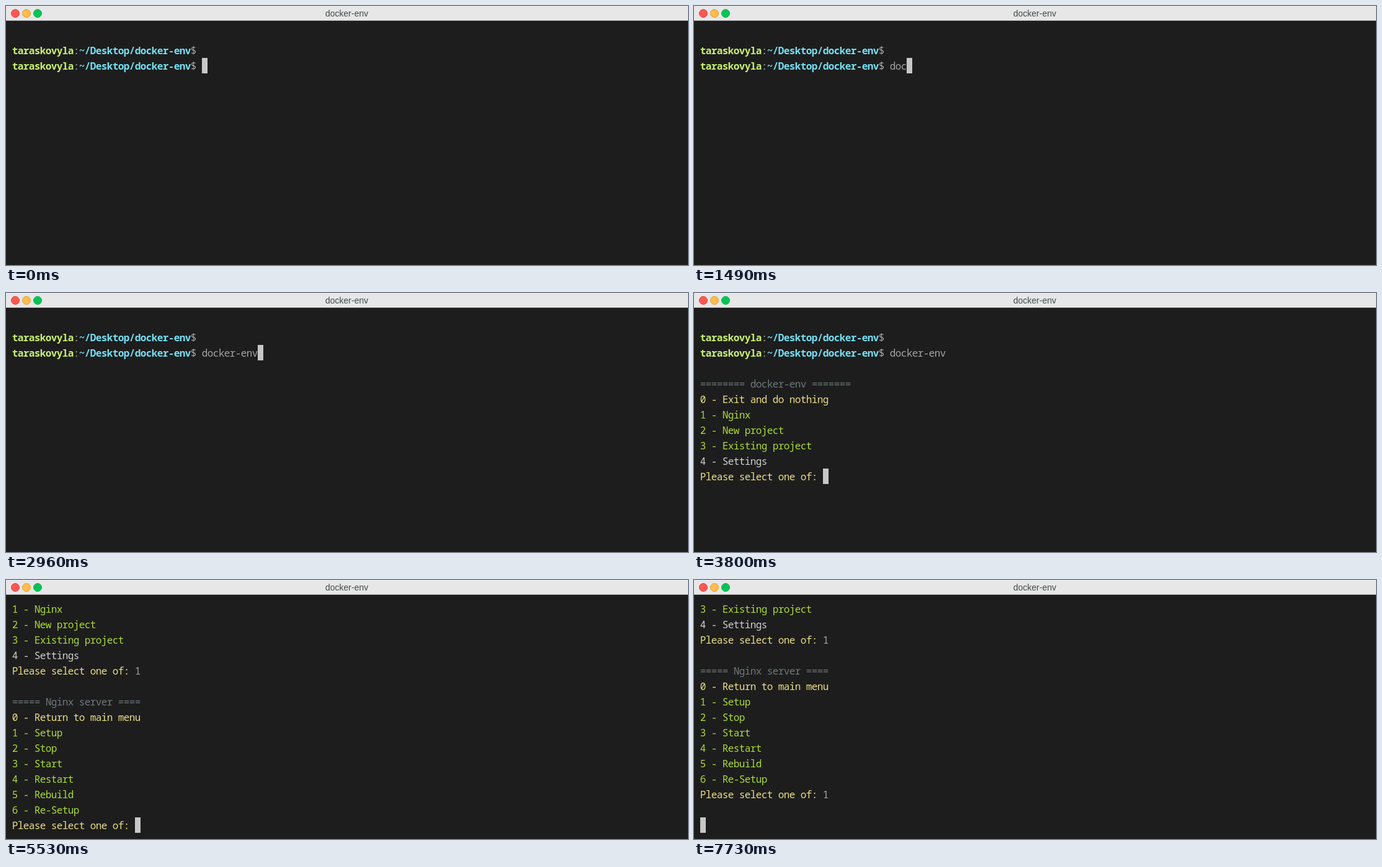
Animation, 1100 px wide and 419 px high, one loop 8 s. Source, as an HTML page with a canvas:

```html
<!DOCTYPE html>
<html lang="en">
<head>
<meta charset="utf-8">
<title>docker-env</title>
<style>
  html, body { margin: 0; width: 100%; height: 100%; overflow: hidden; background: #1d1d1d; }
  canvas { display: block; width: 1100px; height: 419px; }
</style>
</head>
<body>
<canvas id="stage"></canvas>
<script>
const W = 1100, H = 419, LOOP = 8000;
const ROWS = 15, ROW_H = 25, COL_W = 9, LEFT = 10, TOP = 34, BASE = 19;
const MONO = '16px "Noto Sans Mono", "DejaVu Sans Mono", monospace';
const COLOR = {
  user: '#c9f071', path: '#75e0f2', plain: '#a5a5a5', head: '#6f797c',
  yellow: '#ebdf84', green: '#aadb35', white: '#d0d0d0', cursor: '#c7c7c7'
};
const LIGHTS = [['#fc5753', '#e2463f'], ['#fdbc4b', '#e0a03c'], ['#05c455', '#12ae48']];

const canvas = document.getElementById('stage');
const ctx = canvas.getContext('2d');
const dpr = window.devicePixelRatio || 1;
canvas.width = W * dpr;
canvas.height = H * dpr;

// A line is a list of spans: [text, color, bold]
const span = (text, color, bold) => [text, COLOR[color], bold];
const line = (text, color) => [span(text, color)];
const prompt = (command = '') => [
  span('taraskovyla', 'user', true), span(':', 'plain'),
  span('~/Desktop/docker-env', 'path', true), span('$ ' + command, 'plain')
];
const question = (answer = '') => [span('Please select one of: ', 'yellow'), span(answer, 'plain')];
const menu = (title, items) => [
  [], line(title, 'head'),
  ...items.map(([text, color], i) => line(`${i} - ${text}`, color))
];
const greens = names => names.map(name => [name, 'green']);

const mainMenu = menu('======== docker-env =======', [
  ['Exit and do nothing', 'yellow'],
  ...greens(['Nginx', 'New project', 'Existing project']),
  ['Settings', 'white']
]);
const nginxMenu = menu('===== Nginx server ====', [
  ['Return to main menu', 'yellow'],
  ...greens(['Setup', 'Stop', 'Start', 'Restart', 'Rebuild', 'Re-Setup'])
]);

const COMMAND = 'docker-env';
const KEY_TIMES = [1200, 1300, 1440, 1510, 1580, 1730, 2090, 2670, 2830, 2960];

// Terminal content at time t; the cursor follows the last line
function linesAt(t) {
  const typed = KEY_TIMES.filter(k => k <= t).length;
  const out = [[], prompt(), prompt(COMMAND.slice(0, typed))];
  if (t < 3340) return out;
  if (t < 3770) return [...out, []];
  out.push(...mainMenu);
  if (t < 3800) return [...out, []];
  out.push(question(t < 4980 ? '' : '1'));
  if (t < 5380) return out;
  if (t < 5430) return [...out, []];
  out.push(...nginxMenu);
  if (t < 5530) return [...out, []];
  out.push(question(t < 6630 ? '' : '1'));
  if (t >= 7730) out.push([], []);
  return out;
}

function drawTitleBar() {
  ctx.fillStyle = '#e7e7e7';
  ctx.fillRect(0, 0, W, 23);
  ctx.fillStyle = '#f0f0f0';
  ctx.fillRect(0, 0, W, 1);
  ctx.fillStyle = '#b0b0b0';
  ctx.fillRect(0, 23, W, 1);
  LIGHTS.forEach(([fill, rim], i) => {
    ctx.beginPath();
    ctx.arc(15 + 18 * i, 12, 6.5, 0, Math.PI * 2);
    ctx.fillStyle = fill;
    ctx.fill();
    ctx.strokeStyle = rim;
    ctx.stroke();
  });
  ctx.font = '14px "Liberation Sans", Arial, sans-serif';
  ctx.fillStyle = '#3f4a4a';
  ctx.fillText('docker-env', 515, 17);
}

// Each character is centred in its own terminal cell
function drawLine(spans, y) {
  let x = LEFT;
  ctx.textAlign = 'center';
  for (const [text, color, bold] of spans) {
    ctx.font = (bold ? 'bold ' : '') + MONO;
    ctx.fillStyle = color;
    for (const char of text) {
      ctx.fillText(char, x + COL_W / 2, y + BASE);
      x += COL_W;
    }
  }
  ctx.textAlign = 'left';
  return x;
}

function draw(t) {
  ctx.setTransform(dpr, 0, 0, dpr, 0, 0);
  ctx.fillStyle = '#1d1d1d';
  ctx.fillRect(0, 0, W, H);
  drawTitleBar();

  const visible = linesAt(t).slice(-ROWS);
  let x = LEFT;
  visible.forEach((spans, row) => { x = drawLine(spans, TOP + row * ROW_H); });
  ctx.fillStyle = COLOR.cursor;
  ctx.fillRect(x, TOP + (visible.length - 1) * ROW_H, COL_W, ROW_H);
}

const start = performance.now();
function tick() {
  draw((performance.now() - start) % LOOP);
  requestAnimationFrame(tick);
}
tick();
</script>
</body>
</html>
```
